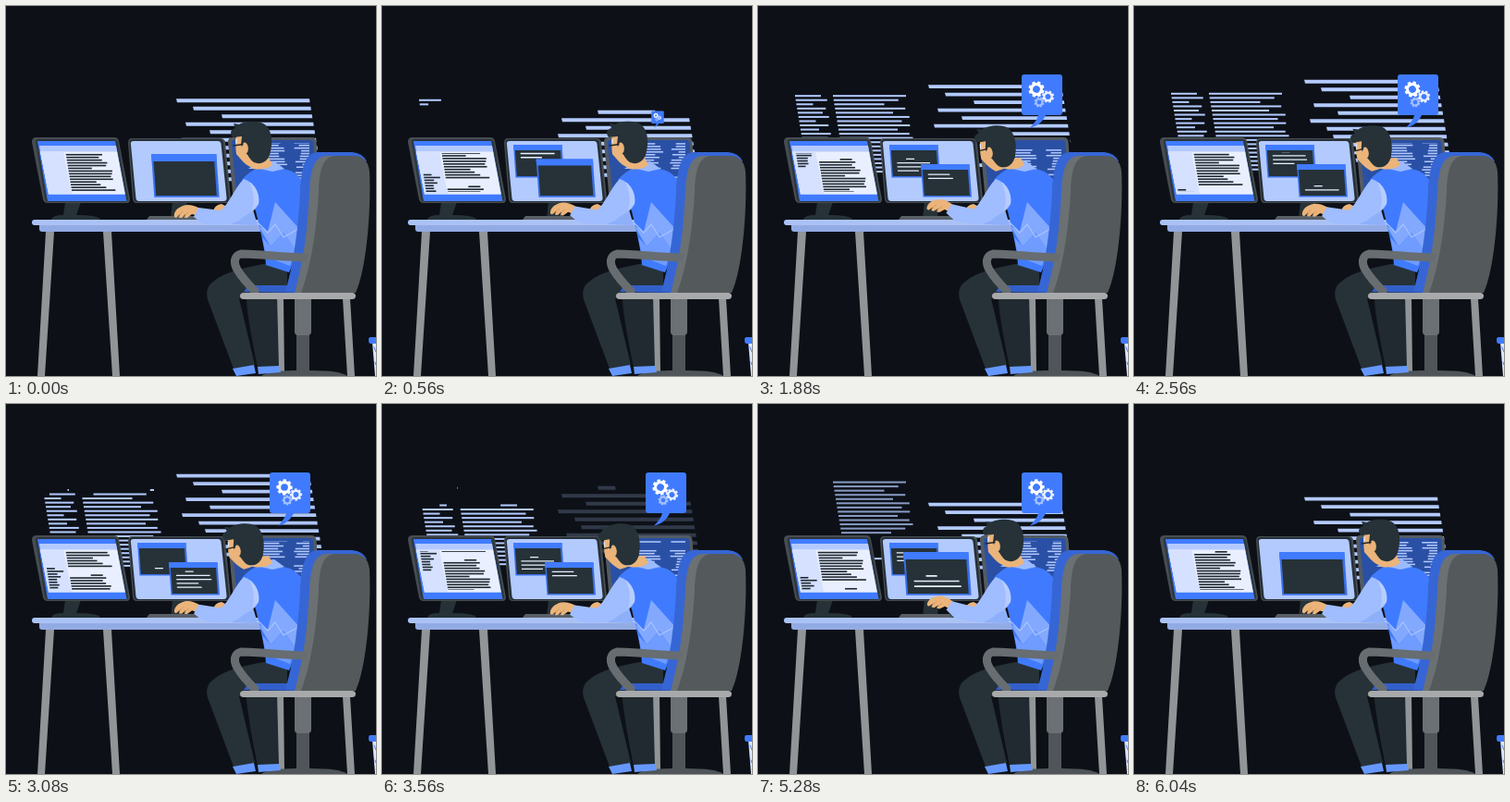
Animation, 400 px wide and 400 px high, one loop 6.08 s. Source, as an HTML page with a canvas:

```html
<!DOCTYPE html>
<html lang="en">
<head>
<meta charset="utf-8">
<title>Programmer at work</title>
<style>
html, body { margin: 0; width: 100%; height: 100%; overflow: hidden; background: #0d1117; }
canvas { display: block; width: 400px; height: 400px; }
</style>
</head>
<body>
<canvas id="stage" width="400" height="400"></canvas>
<script>
const LOOP = 6080;
const c = document.getElementById('stage').getContext('2d');
const BLUE = '#407bff', PALE = '#b3caff', DARK = '#263238', SKIN = '#ebb47a';

const clamp = v => Math.max(0, Math.min(1, v));
const ramp = (t, start, length) => clamp((t - start) / length);
const ease = v => v * v * (3 - 2 * v);
const rnd = i => { const v = Math.sin(i * 12.9898 + 4) * 43758.5453; return v - Math.floor(v); };

// Linear interpolation through shared key times
const KEYS = [0, 1160, 2560, 3560, 4440, 5280, LOOP];
function track(t, values) {
  let i = 0;
  while (i < KEYS.length - 2 && t >= KEYS[i + 1]) i++;
  return values[i] + (values[i + 1] - values[i]) * (t - KEYS[i]) / (KEYS[i + 1] - KEYS[i]);
}

function shape(fill, d) {
  c.fillStyle = fill;
  c.fill(new Path2D(d));
}
function line(color, width, d) {
  c.strokeStyle = color;
  c.lineWidth = width;
  c.lineJoin = c.lineCap = 'round';
  c.stroke(new Path2D(d));
}
function box(fill, x, y, w, h) {
  c.fillStyle = fill;
  c.fillRect(x, y, w, h);
}
function group(draw) {
  c.save();
  draw();
  c.restore();
}
function clipped(d, draw) {
  group(() => { c.clip(new Path2D(d)); draw(); });
}
function pivot(x, y, angle, scale = 1) {
  c.translate(x, y);
  c.rotate(angle);
  c.scale(scale, scale);
  c.translate(-x, -y);
}

// Floating code on the right: typed and wiped leftwards in waves, drifting up
const LEFTS = [184, 202, 233, 194, 220, 190, 208, 215, 199, 206, 192];
function rightCode(t) {
  const u = (t - 3700 + LOOP) % LOOP;
  group(() => {
    c.globalAlpha = clamp((LOOP - u) / 640);
    LEFTS.forEach((x, i) => {
      const y = 121.3 - u * 0.008 + i * 8.5;
      const end = 328 + i * 1.4, w = end - x;
      const wave = start => w * ramp(u, start + i * 170, 250);
      const bar = (typed, wiped) => {
        const from = end - typed, to = end - wiped;
        if (to > from) shape(PALE, `M${from} ${y - 1.9}H${to}l.5 3.8H${from + 1}Z`);
      };
      bar(wave(0), wave(2510));
      bar(wave(3070), wave(5400));
    });
  });
}

// Floating code on the left: typed and wiped from left to right
const NARROW = [28, 34, 18, 31, 27, 33, 18, 31, 20, 32];
const WIDE = [79, 70, 54, 76, 62, 79, 70, 78, 64, 76];
function column(x, widths, top, rows, begin, wipe) {
  for (let i = 0; i < rows; i++) {
    const x0 = x + i * 0.75, w = widths[i % 10];
    const a = wipe(i), b = begin(i);
    if (b > a) box(PALE, x0 + w * a, top + i * 4.55 - 1, w * (b - a), 2);
  }
}
function leftCode(t) {
  const topA = 99.7 - (t - 1160) * 0.0035;
  const wipe = i => ramp(t, 2920 + 130 * i, 170);
  const typed = (start, step) => i =>
    ramp(t, i < 9 ? start + step * i : start + 250 + (i - 9) * 40, 130);
  if (t > 400) {
    column(40, NARROW, topA, 12, typed(450, 75), wipe);
    column(81, WIDE, topA, 19, typed(600, 130), wipe);
  }
  if (t > 3400) group(() => {
    c.globalAlpha = 1 - 0.25 * ramp(t, 5000, 280) - 0.75 * ramp(t, 5280, 500);
    column(81, WIDE, 87.6 - (t - 4440) * 0.0036, 17, i => ramp(t, 3560 + 130 * i, 150), () => 0);
  });
}

function leftMonitor(t) {
  shape(DARK, 'M64 212H81L76 226Q100 226 102 231H49Q50 226 62 226Z');
  shape('#464d52', 'M33 142H117Q121 142 122 146L134 209Q134 213 130 213H45Q41 213 40 209L28 147Q28 142 33 142Z');
  shape('#2d363c', 'M36 144H116Q120 144 121 147L132 208Q132 212 129 212H46Q43 212 42 209L32 148Q31 144 36 144Z');
  shape(BLUE, 'M34 146H118L130.500 211H45Z');
  shape(PALE, 'M36 151H119L129 204H46Z');
  shape('#e9effe', 'M37 157.500H120L128.500 203H46Z');
  shape('#d5e1ff', 'M37 157.500H62L71 203H46Z');
  clipped('M36 159H122L130 201H44Z', () => {
    const scroll = track(t, [0, 28, 57, 91, 126, 162, 204]);
    for (let k = 0; k < 6; k++) {
      for (let r = 0; r < 15; r++) {
        const y = 157 + 51 * k - scroll + 2.95 * r;
        const x = 64.5 + (y - 158) * 0.16;
        if (r) box('#1d272e', x, y, 23 + 25 * rnd(r), 1.6);
        else box('#1d272e', x + 23, y, 13, 1.6);
      }
    }
    const side = track(t, [0, 42, 92, 132, 176, 222, 266]);
    [[0, 14], [88, 8], [134, 14], [207, 5]].forEach(([offset, rows]) => {
      for (let r = 0; r < rows; r++) {
        const y = 202 + offset - side + 2.95 * r;
        box('#1d272e', 41 + (y - 158) * 0.16, y, 8 + 10 * rnd(r + 30), 1.6);
      }
    });
  });
}

function codeWindow(x, y, sx, sy, rows) {
  group(() => {
    c.transform(sx, 0, 0.07 * sy, sy, x, y);
    box('#386fe9', 0, 0, 52.5, 35.5);
    box(BLUE, 0, 0, 52.5, 6);
    box(DARK, 1.5, 6, 49, 28);
    c.beginPath();
    c.rect(1.5, 8, 49, 23);
    c.clip();
    rows();
  });
}
function scrollRows(top, period, count, width) {
  for (let k = -2; k < 5; k++) {
    for (let r = 0; r < count; r++) {
      const y = top + k * period + r * 4.25;
      if (r) box('#e9effe', 7, y, width * (0.5 + 0.5 * rnd(r + 8)), 1.3);
      else box('#e9effe', 17, y, 9, 1.3);
    }
  }
}
function middleMonitor(t) {
  shape(DARK, 'M180 211H196L194 230H178Z');
  shape('#464d52', 'M136 143H232Q236 143 237 147L243 209Q243 213 239 213H141Q138 213 137 209L132 148Q132 143 136 143Z');
  shape('#263037', 'M138 144H231Q234 144 235 148L241 208Q241 212 238 212H142Q139 212 138 208L133.500 148Q133 144 138 144Z');
  shape(PALE, 'M138 146H229Q232 146 232.500 149L238.500 207Q239 211 235 211H144Q141 211 140.500 208L135 150Q134 146 138 146Z');
  const back = ease(ramp(t, 300, 260)) * (1 - ease(ramp(t, 5420, 260)));
  if (back > 0) group(() => {
    pivot(168, 168, 0, back);
    codeWindow(142, 150, 1, 1, () =>
      scrollRows(23 - track(t, [-20, 0, 16, 41, 61, 83, 100]), 33, 4, 38));
  });
  const big = 1 - ease(ramp(t, 420, 280)) + ease(ramp(t, 4900, 300));
  codeWindow(176 - 19 * big, 171 - 11 * big, 1 + 0.34 * big, 1 + 0.32 * big, () => {
    if (t > 600 && t < 5750) scrollRows(23 - track(t, [-40, -18, 0, 26, 47, 72, 95]), 34, 5, 39);
  });
}

function rightMonitor(t) {
  shape('#535b64', 'M245 142H330Q335 142 335.500 147L340 213H246L240 147Q240 142 245 142Z');
  shape('#2a50a5', 'M246 145H329Q332 145 332.500 148L337 210H250L244 149Q244 145 246 145Z');
  clipped('M246 148H330L336 205H250Z', () => {
    const scroll = track(t, [0, 28, 57, 91, 126, 162, 204]);
    for (let k = 0; k < 6; k++) {
      for (let r = 0; r < 15; r++) {
        const y = 147 + 51 * k - scroll + 2.95 * r;
        box(PALE, 278, y, 16 + 10 * rnd(r + 50), 1.5);
        const w = 7 + 10 * rnd(r + 70);
        box(PALE, 328 - w, y, w, 1.5);
      }
    }
  });
}

function desk() {
  shape('#919598', 'M43 244H52L42 400H34ZM105 244H114L123 400H115Z');
  shape('#93abe4', 'M36 236H282V244H39Q36 244 36 241Z');
  shape('#abc2f5', 'M31 231H275V237H31Q28 237 28 234Q28 231 31 231Z');
  shape('#596066', 'M155 227H207L211 231H152Z');
}

function chairBase() {
  shape('#919598', 'M292 316H300L301 396H293ZM364 316H372L377 400H369Z');
  shape('#4f5558', 'M314 350H328V396H314ZM276 400Q284 394 312 394H330Q361 394 369 400Z');
  shape('#6a7073', 'M312 316H330V352Q330 356 326 356H316Q312 356 312 352Z');
}

function legs() {
  shape('#202a30', 'M259 312H293L295 391H272Q263 350 259 312Z');
  shape(DARK, 'M284 278C254 283 234 289 224 298C216 304 216 312 219 320L246 392L269 388L252 316L304 309V282Z');
  shape('#6598ff', 'M245 392L268 388L270 397L249 400ZM272 390L295 389L297 396L273 398Z');
}

function torso() {
  shape('#335fca', 'M257 309L262 302H308L313 310Z');
  shape(BLUE, 'M255 188C263 179 270 175 277 175L299 176C313 178 321 186 323 199C323 236 315 270 306 288L281 280C280 262 275 244 270 222Z');
  clipped('M255 188L277 175L299 176L321 186V240L306 288L281 280L270 222Z', () => {
    shape('#83a9ff', 'M291 212L319 243L313 264L300 245L286 260L273 238L283 244Z');
    shape('#709cff', 'M286 260L300 245L313 264L307 281L281 271L277 250Z');
    line('#a9c3ff', 1.2, 'M272 234L283 245L291 236L300 250L318 240');
  });
  shape('#9bbaff', 'M262 176L270 170L290 168L301 176L288 179L275 176Z');
}

function head(t) {
  const down = ease(ramp(t, 1400, 400)) - ease(ramp(t, 4650, 400));
  shape(SKIN, 'M260 166L284 164L288 172Q279 178 267 176Z');
  group(() => {
    c.translate(-7 * down, 4 * down);
    pivot(275, 172, -0.06 * down);
    shape(SKIN, 'M249 139C248 147 248 153 249 160C254 166 258 171 264 174L272 172L270 164L258 139Z');
    shape(DARK, 'M245 142C241 136 244 133 248 132L246 127L252 128C258 124 274 123 281 129C289 137 288 152 285 161C282 169 275 172 268 169C263 166 262 160 258 158L254 150L255 141Z');
    c.fillStyle = SKIN;
    c.beginPath();
    c.ellipse(258.5, 153.5, 3.3, 6, -0.1, 0, 7);
    c.fill();
    line('#202a30', 1.3, 'M246 151L256 149.500');
    line('#dbe6ff', 1.3, 'M249 144V148');
  });
}

function arms(t) {
  const lift = Math.abs(Math.sin(t / LOOP * 12 * Math.PI));
  shape(SKIN, 'M224 221Q226 215 233 214L239 217L235 222Z');
  shape('#8eb0fa', 'M244 236C250 227 257 221 267 220L272 237Z');
  group(() => {
    pivot(246, 230, 0.13 * lift);
    group(() => {
      pivot(208, 224, 0.1 * lift);
      shape(SKIN, 'M210 219C201 214 194 214 189 217C184 219 181 224 182 228L184 229L188 225L187 229L190 229L194 225L193 229L196 229L201 225L208 227Z');
      line('#c98c58', 0.6, 'M187 227L191 222M193 227L197 223');
    });
    shape('#9fbdff', 'M208 218L232 221L250 213L256 228C242 238 228 238 212 235L203 228Z');
  });
  shape('#9fbdff', 'M257 187C267 190 275 201 273 214C269 223 260 225 254 230C249 235 242 236 235 236L233 220C241 214 247 197 257 187Z');
  shape('#b7cdff', 'M263 190C270 194 275 205 273 214L266 221C270 210 267 198 263 190Z');
}

function chairBack() {
  shape('#3666d5', 'M302 309C313 272 317 226 318 199C320 171 324 159 337 158H374Q386 159 390 168L345 166L314 309Z');
  shape('#6b7073', 'M312 310C324 268 326 232 328 204C329 177 333 163 346 162H376V310Z');
  shape('#54595c', 'M319 310C332 276 337 226 338 200C339 178 342 162 357 162H376Q391 162 393 179C395 225 389 287 378 310Z');
  line('#676d70', 9, 'M322 272C298 271 270 268 254 268C246 270 246 278 250 285Q256 295 269 308');
  shape('#a7a9ab', 'M257 310H374Q378 310 378 313.500Q378 317 374 317H257Q253 317 253 313.500Q253 310 257 310Z');
}

function bin() {
  shape('#dbe6ff', 'M396 363H400V400H399Z');
  shape(BLUE, 'M394 358H400V365H394Q392 365 392 361Q392 358 394 358Z');
  line(BLUE, 1, 'M398 369L400 374M399 385L400 388');
}

function gear(x, y, r, color, angle) {
  group(() => {
    c.translate(x, y);
    c.rotate(angle);
    c.fillStyle = color;
    for (let i = 0; i < 8; i++) {
      c.rotate(Math.PI / 4);
      c.fillRect(-r * 0.2, -r, r * 0.4, r * 0.5);
    }
    c.lineWidth = r * 0.36;
    c.strokeStyle = color;
    c.beginPath();
    c.arc(0, 0, r * 0.63, 0, 7);
    c.stroke();
  });
}
function bubble(t) {
  const size = ease(ramp(t, 480, 220)) * (1 - ease(ramp(t, 5820, 180)));
  if (size <= 0) return;
  group(() => {
    pivot(294, 131, 0, size);
    shape(BLUE, 'M288 74H326Q329 74 329 77V115Q329 118 326 118H311C308 125 302 130 294 131.500C299 127 302 122 303 118H288Q285 118 285 115V77Q285 74 288 74Z');
    const turn = t / LOOP * Math.PI * 2;
    gear(301, 90, 8.6, '#fff', turn);
    gear(313.5, 98, 6.6, '#e9effe', -turn);
    gear(304, 104, 5.4, '#a5c0ff', -turn);
  });
}

function frame(now) {
  const t = now % LOOP;
  box('#0d1117', 0, 0, 400, 400);
  rightCode(t);
  leftCode(t);
  rightMonitor(t);
  middleMonitor(t);
  leftMonitor(t);
  desk();
  chairBase();
  legs();
  torso();
  head(t);
  arms(t);
  chairBack();
  bin();
  bubble(t);
  requestAnimationFrame(frame);
}
requestAnimationFrame(frame);
</script>
</body>
</html>
```
